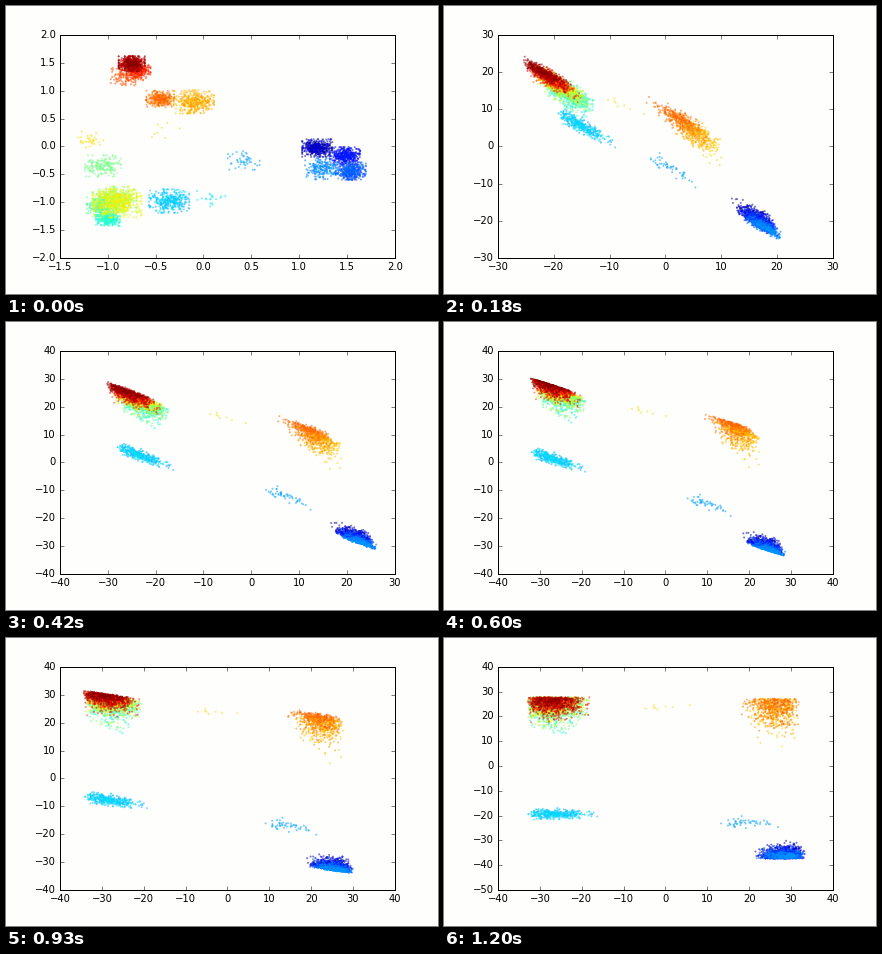
Animation of 432 by 288 pixels, one loop 1230 ms. Source, as a matplotlib script:

```python
import matplotlib.pyplot as plt
import numpy as np
from matplotlib.animation import FuncAnimation

FRAMES = 41
INTERVAL = 30
KEYS = np.array([6, 20, 27, 40])
PAPER = "#fefefd"
rng = np.random.default_rng(4)

# Skew direction, side the cloud fades to, length, thickness, drift, centres at KEYS
GROUPS = {
    "blue": (-1, 1, 2.3, 2, -1.2, [(17, -20.3), (24.4, -30.3), (23.8, -29.5), (28.3, -35.7)]),
    "sky": (1, 0, 3, 1, 1.5, [(1, -6), (10, -15), (12, -14), (19.5, -23)]),
    "cyan": (1, 0, 3.4, .9, 0, [(-15, 5.5), (-26.7, 1.2), (-29, -1.6), (-26, -19.4)]),
    "warm": (1, -1, 3, 4, 3, [(-19.5, 16.8), (-26.3, 25.2), (-29.4, 29.2), (-26.8, 24.5)]),
    "orange": (-1, -1, 2.8, 5.5, 3.5, [(4.2, 5), (17, 11), (20, 18), (26, 22.8)]),
}
between = np.mean([GROUPS["warm"][-1], GROUPS["orange"][-1]], axis=0)
GROUPS["stray"] = (1, 0, 3, .9, 0, between)

# Blobs in order of colour: group, count, start x, y, spread
BLOBS = [
    ("blue", 480, 1.19, -.03, .075), ("blue", 430, 1.48, -.17, .075),
    ("blue", 430, 1.54, -.44, .075), ("blue", 220, 1.25, -.4, .09),
    ("sky", 50, .42, -.25, .08),
    ("cyan", 350, -.36, -.98, .1), ("cyan", 20, .08, -.93, .07),
    ("warm", 350, -1, -1.3, .06), ("warm", 300, -1.05, -1.08, .08),
    ("warm", 180, -1.05, -.35, .09), ("warm", 500, -.93, -.95, .11),
    ("warm", 450, -.9, -1.02, .12), ("warm", 35, -1.18, .1, .08),
    ("stray", 8, -.45, .28, .1),
    ("orange", 400, -.1, .8, .1), ("orange", 330, -.45, .85, .07),
    ("warm", 150, -.8, 1.25, .08), ("warm", 250, -.68, 1.35, .06),
    ("warm", 650, -.75, 1.48, .065),
]


def clock(n):
    """Fast at first, then slowing."""
    return np.log(n + .35)


class Cloud:
    """All points of one group, drawn out along a slope that levels off."""

    def __init__(self, name):
        skew, self.side, self.length, self.thick, self.drift, centres = GROUPS[name]
        self.centres = np.array(centres)
        blobs = [b for b in BLOBS if b[0] == name]
        spots = [np.add((x, y), size * np.clip(rng.normal(size=(n, 2)), -2.1, 2.1))
                 for _, n, x, y, size in blobs]
        self.start = np.concatenate(spots)
        n = len(self.start)
        self.age = np.linspace(1, -1, n)
        self.along = skew * (2.6 * rng.beta(2.5, 4, n) - 1) / .46
        self.across = np.clip(rng.normal(size=n), -2.8, 2.8)

    def place(self, n):
        w = n / (FRAMES - 1)
        cx, cy = (np.interp(clock(n), clock(KEYS), c) for c in self.centres.T)
        dx = self.length * (.55 + .45 * w) * self.along + self.drift * (1 - w) * self.age
        dy = self.across
        if self.side:
            # Fold the cloud over, so that a sharp edge forms
            folded = (1 - w) * dy + w * abs(dy)
            dy = self.side * (folded * (1 + .3 * self.age) - .8 * w + (1 - w) * self.age)
        dy = (.9 + (self.thick - .9) * w) * dy - .95 * (1 - w) * dx
        u = min(1, (clock(n) - clock(0)) / (clock(KEYS[0]) - clock(0)))
        return (1 - u) * self.start + u * np.column_stack((cx + dx, cy + dy))


clouds = {name: Cloud(name) for name in GROUPS}
labels = np.repeat([b[0] for b in BLOBS], [b[1] for b in BLOBS])
hues = np.linspace(0, 1, len(labels))


def positions(n):
    spots = np.empty((len(labels), 2))
    for name, cloud in clouds.items():
        spots[labels == name] = cloud.place(n)
    return spots


def nice_ticks(values):
    """Round ticks that enclose the values with a five percent margin."""
    lo, hi = values.min(), values.max()
    pad = .05 * (hi - lo)
    lo, hi = lo - pad, hi + pad
    raw = (hi - lo) / 9
    unit = 10 ** np.floor(np.log10(raw))
    step = unit * next(m for m in (1, 2, 5, 10) if m * unit >= raw)
    return np.arange(np.floor(lo / step), np.ceil(hi / step) + 1) * step


plt.rcParams.update({"font.family": "DejaVu Sans", "font.size": 10,
                     "ytick.alignment": "center"})
fig = plt.figure(figsize=(6, 4), dpi=72, facecolor=PAPER)
ax = fig.add_axes([.125, .125, .775, .775], facecolor=PAPER)
ax.tick_params(direction="in", length=4, width=.5, pad=4, top=True, right=True)
for spine in ax.spines.values():
    spine.set_linewidth(1)
dots = ax.scatter(*positions(0).T, c=hues, cmap="jet", s=4, alpha=.55, linewidths=0)


def draw(n):
    spots = positions(n)
    dots.set_offsets(spots)
    xticks, yticks = nice_ticks(spots[:, 0]), nice_ticks(spots[:, 1])
    ax.set(xticks=xticks, yticks=yticks,
           xlim=xticks[[0, -1]], ylim=yticks[[0, -1]])
    return (dots,)


anim = FuncAnimation(fig, draw, frames=FRAMES, interval=INTERVAL,
                     init_func=lambda: draw(0), repeat=True, repeat_delay=0)
plt.show()
```
